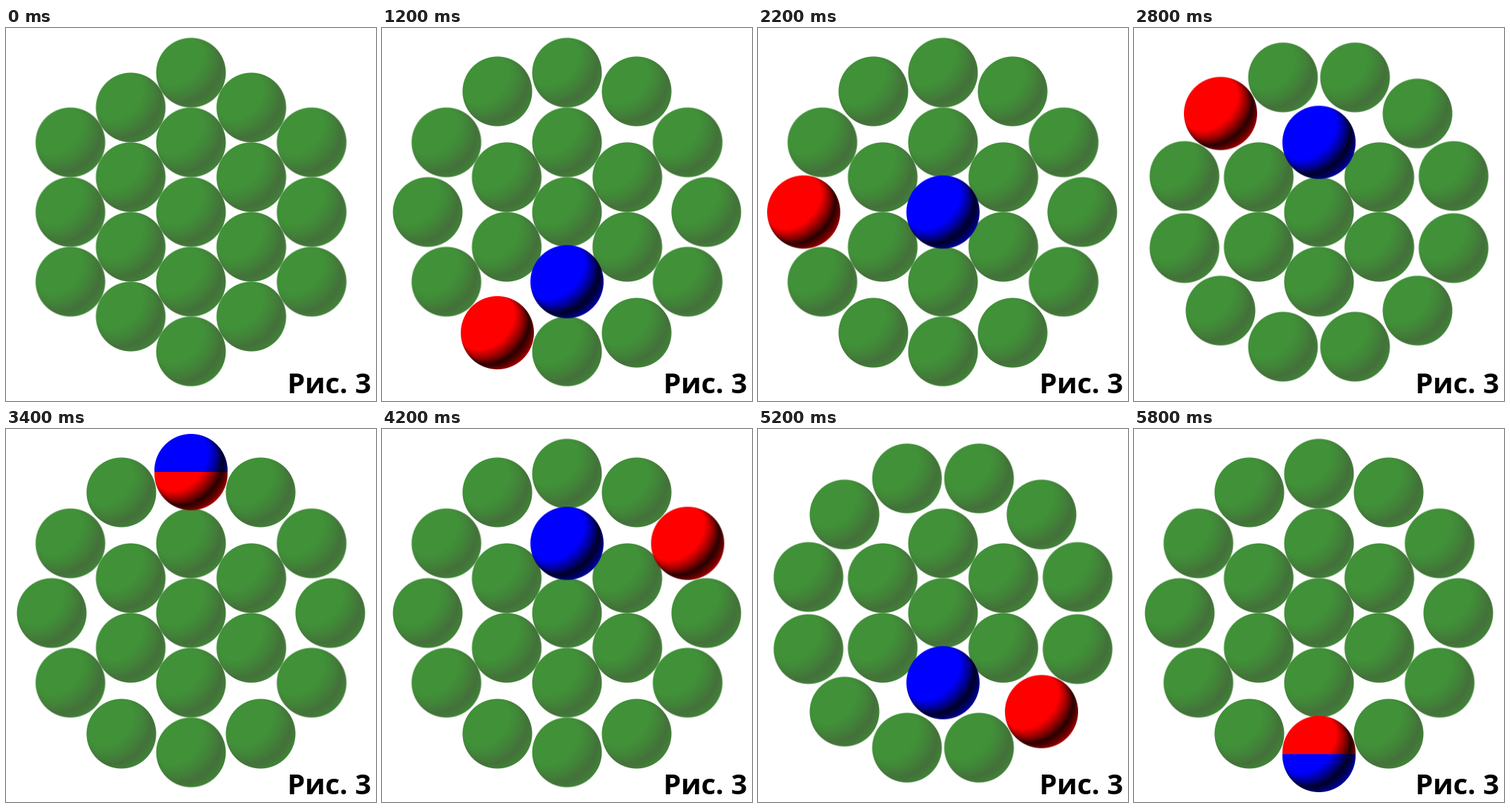
An HTML page with a canvas that plays this animation: 526 px wide and 530 px high, repeating every 6000 ms.

```html
<!DOCTYPE html>
<html lang="ru">
<head>
<meta charset="utf-8">
<title>Рис. 3</title>
<style>
  html, body { margin: 0; width: 100%; height: 100%; overflow: hidden; background: #fff; }
  canvas { position: absolute; left: 0; top: 0; }
  p {
    position: absolute; right: 7px; top: 484px; margin: 0;
    font: bold 40px/40px "Open Sans", "Noto Sans", sans-serif;
    white-space: pre; color: #000;
  }
</style>
</head>
<body>
<canvas id="stage" width="526" height="530"></canvas>
<p>Рис. 3</p>
<script>
const ctx = document.getElementById('stage').getContext('2d');
const CX = 263, CY = 261.5, GAP = 99, RING = 2 * GAP;
const HALF = 54, LOOP = 6000;
const rad = deg => deg * Math.PI / 180;
const clamp = v => Math.max(0, Math.min(1, v));

// A ball lit from the upper left, with a weaker light behind it.
function makeBall(r, lit, dark, gain, back) {
  const size = 2 * HALF;
  const sprite = document.createElement('canvas');
  sprite.width = sprite.height = size;
  const g = sprite.getContext('2d');
  const img = g.createImageData(size, size);
  for (let i = 0; i < size * size; i++) {
    const dx = i % size + 0.5 - HALF;
    const dy = Math.floor(i / size) + 0.5 - HALF;
    const dist = Math.hypot(dx, dy);
    const nz = Math.sqrt(Math.max(0, 1 - (dist / r) ** 2));
    const d = 0.7 * nz - 0.5 * (dx + dy) / r;
    const light = clamp(0.12 + (d > 0 ? gain * d : -back * d));
    for (let c = 0; c < 3; c++) img.data[4 * i + c] = dark[c] + (lit[c] - dark[c]) * light;
    img.data[4 * i + 3] = 255 * clamp(r - dist + 0.5);
  }
  g.putImageData(img, 0, 0);
  return sprite;
}

const green = makeBall(49.5, [64, 145, 56], [68, 108, 58], 1.4, 0.95);
const red = makeBall(52, [255, 0, 0], [10, 0, 0], 1.65, 0.9);
const blue = makeBall(52, [0, 0, 255], [0, 0, 10], 1.65, 0.9);

const put = (ball, x, y) => ctx.drawImage(ball, x - HALF, y - HALF);

// Angles run clockwise from the bottom.
function putAt(ball, deg, r) {
  const a = rad(deg);
  put(ball, CX - r * Math.sin(a), CY + r * Math.cos(a));
}

function drawPair(deg) {
  putAt(red, deg, RING);
  const c = Math.cos(rad(deg));
  const row = Math.trunc(2.001 * c);
  if (Math.abs(row) < 2) {
    put(blue, CX, CY + row * GAP);
    return;
  }
  // Where the two meet, blue sits slightly further out and shows its outer half.
  const dir = Math.sign(row);
  const split = Math.round(CY + dir * (RING + 2.25));
  ctx.save();
  ctx.beginPath();
  ctx.rect(0, split, 526, dir * 120);
  ctx.clip();
  put(blue, CX, CY + dir * (RING + 4.5));
  ctx.restore();
}

function draw(t) {
  const packed = t < 600;
  const moving = t >= 800;
  // The turn pauses for one extra beat just before the quarter.
  const step = moving ? Math.floor((t - 800) / 200) - (t >= 2000 ? 1 : 0) : 0;
  const turn = step * 15;

  ctx.clearRect(0, 0, 526, 530);
  put(green, CX, CY);
  for (let k = 0; k < 6; k++) putAt(green, k * 60, GAP);
  for (let k = 0; k < 12; k++) {
    const r = packed && k % 2 ? GAP * Math.sqrt(3) : RING;
    putAt(green, turn + k * 30, r);
  }
  if (moving) drawPair(turn);
}

const start = performance.now();
function tick() {
  draw((performance.now() - start) % LOOP);
  requestAnimationFrame(tick);
}
tick();
</script>
</body>
</html>
```
